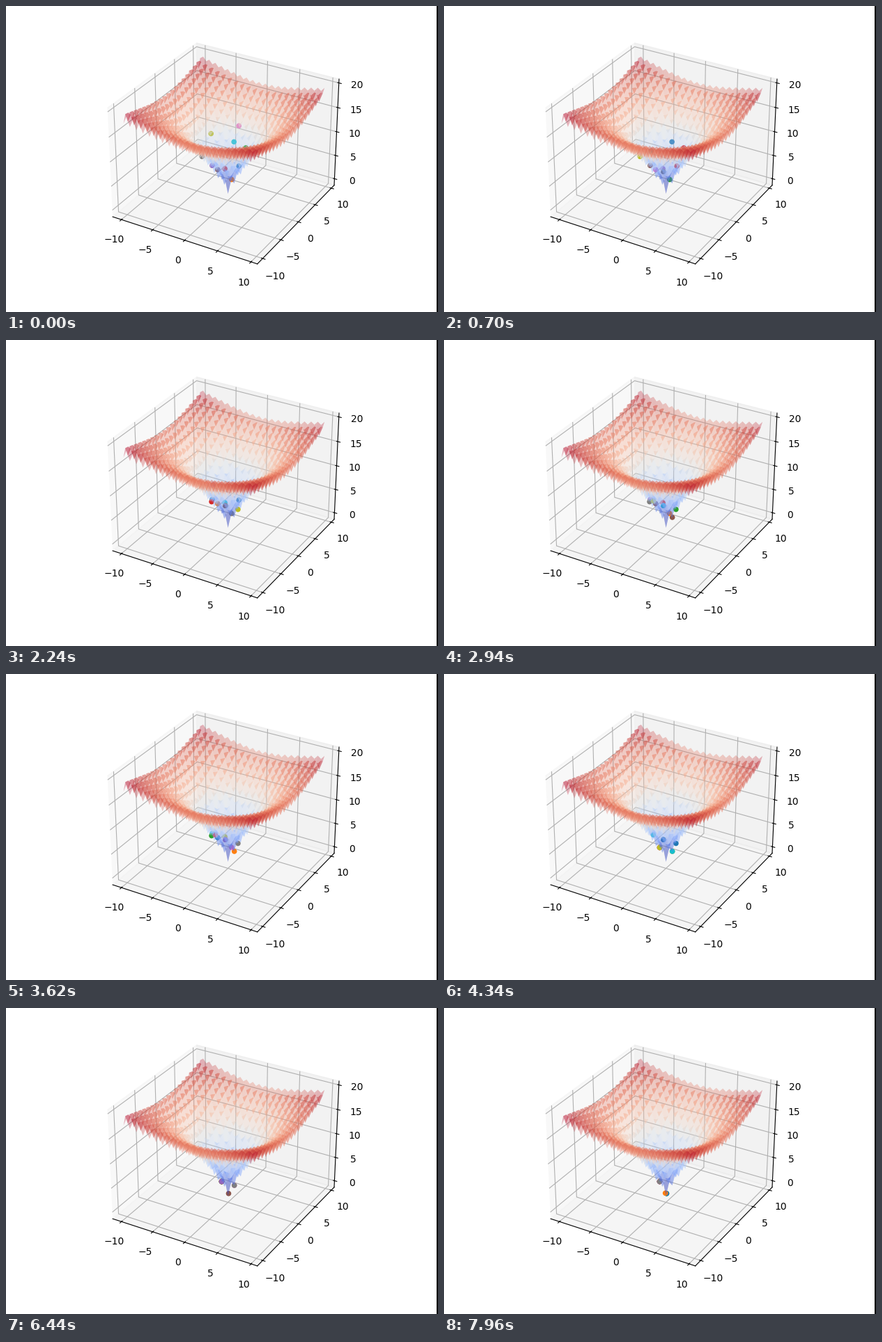
Recreate the animation shown at these times as a matplotlib script. Size 620 px wide and 440 px high, loop 8 s.

```python
import numpy as np
import matplotlib.pyplot as plt
from matplotlib.animation import FuncAnimation
from mpl_toolkits.mplot3d import proj3d

W, H = 620, 440
STEP, LOOP = 20, 8000
TAB10 = plt.get_cmap("tab10").colors

# The search: generation start times, delay between particle redraws.
STARTS = [20, 680, 1380, 2240, 2940, 3620, 4200, 5020, 5720, 6440, 7120, 7560]
STAGGER = 40
SETTLED = 9
SWARM = [(1.4, 0.5), (1.1, -0.9), (1, 3.15), (-1.1, 1.05), (-2, -0.85),
         (-1.2, -0.75), (-1.1, 4.9), (-2.9, -2), (-3.9, 2.1), (-0.9, 3.2)]


def ackley(x, y):
    bowl = 20 * np.exp(-0.2 * np.sqrt((x * x + y * y) / 2))
    waves = np.exp((np.cos(2 * np.pi * x) + np.cos(2 * np.pi * y)) / 2)
    return 20 + np.e - bowl - waves


def search(i, point):
    """Positions of particle i, one per generation."""
    path = [np.array(point, float)]
    for g in range(1, len(STARTS) + 1):
        p = path[-1]
        ceiling = max(2.7, 10.35 - 0.9 * g)
        if g - SETTLED == i:
            p = 0.1 * p                      # one at a time finds the minimum
        elif ackley(*p) > ceiling:
            p = np.round(p * (0.7, 0.3))     # drop into a lower hollow
        path.append(p)
    return np.array(path)


def padded(values):
    """Limits with a 5 % margin plus the 1/48 view margin."""
    lo, hi = np.min(values), np.max(values)
    for share in (1 / 20, 1 / 48):
        pad = (hi - lo) * share
        lo, hi = lo - pad, hi + pad
    return lo, hi


def snapshot():
    fig.canvas.draw()
    return np.array(fig.canvas.buffer_rgba())


def to_pixels(path):
    x, y = path.T
    px, py, _ = proj3d.proj_transform(x, y, ackley(x, y), ax.get_proj())
    return ax.transData.transform(np.column_stack([px, py]))


fig = plt.figure(figsize=(W / 100, H / 100), dpi=100, facecolor="white")
ax = fig.add_axes([62 / W, 45.8 / H, 496 / W, 369.6 / H], projection="3d")
ax.patch.set_visible(False)

grid = np.arange(-10, 10, 0.5)
X, Y = np.meshgrid(grid, grid)
Z = ackley(X, Y)
surface = ax.plot_surface(X, Y, Z, cmap="coolwarm", alpha=0.3)
ax.set(xlim=padded(X), ylim=padded(Y), zlim=padded(Z),
       xticks=range(-10, 11, 5), yticks=range(-10, 11, 5),
       zticks=range(0, 21, 5))

# Box and surface never change: render each once, particles go in between.
surface.set_visible(False)
box_layer = snapshot()
surface.set_visible(True)
ax.set_axis_off()
fig.patch.set_alpha(0)
surface_layer = snapshot()
fig.patch.set_alpha(1)

tracks = [to_pixels(search(i, p)) for i, p in enumerate(SWARM)]
ax.remove()

flat = fig.add_axes([0, 0, 1, 1], zorder=1)
flat.set(xlim=(0, W), ylim=(0, H))
flat.axis("off")
flat.axvspan(618, W, color="black", lw=0)
dots = flat.scatter(*np.zeros((2, len(SWARM))), s=20)
fig.figimage(box_layer, zorder=0)
fig.figimage(surface_layer, zorder=2)


def draw(frame):
    t = frame * STEP
    spots, colors = [], []
    for i, track in enumerate(tracks):
        g = sum(start + STAGGER * i <= t for start in STARTS)
        spots.append(track[g])
        colors.append(TAB10[(i + g * (g + 1) // 2) % 10])
    dots.set_offsets(spots)
    dots.set_facecolor(colors)
    return [dots]


anim = FuncAnimation(fig, draw, frames=LOOP // STEP, interval=STEP,
                     repeat=True, repeat_delay=0)
plt.show()
```
